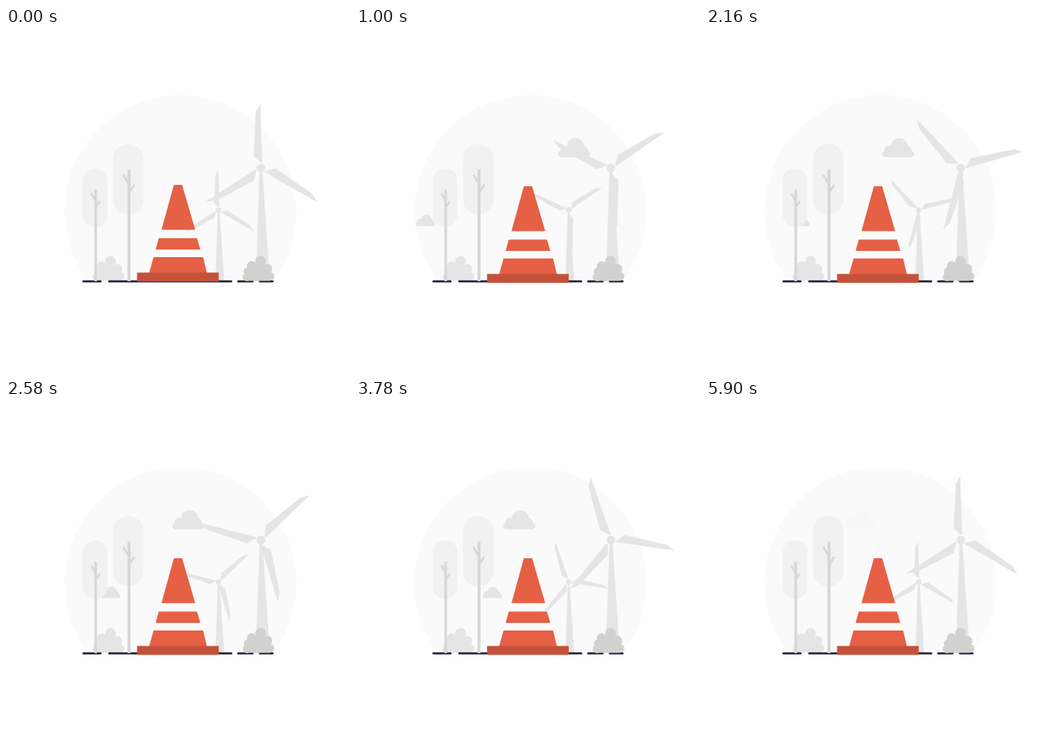
Recreate the animation shown at these times as an HTML page. Size 500 by 500 pixels, loop 6020 ms.

```html
<!DOCTYPE html>
<html lang="en">
<head>
<meta charset="utf-8">
<title>Under construction</title>
<style>
  html, body { margin: 0; width: 100%; height: 100%; overflow: hidden; background: #fff; }
  svg { display: block; width: 100%; height: 100%; }
  .light { fill: #e5e5e5; }
  .crown { fill: #f1f1f1; }
  .wood { fill: none; stroke: #d7d7d7; }
  .ground { stroke: #25233c; stroke-width: 3; stroke-linecap: round; }
</style>
</head>
<body>
<svg viewBox="0 0 500 500">
  <defs>
    <clipPath id="horizon"><rect width="500" height="367"/></clipPath>
    <path id="blade" d="M-1-93.5L-7.5-81L-10.5-18L.5-7L2-8Z"/>
    <g id="rotor">
      <use href="#blade"/>
      <use href="#blade" transform="rotate(122) scale(1.03)"/>
      <use href="#blade" transform="rotate(239.3)"/>
      <circle r="6.3"/>
    </g>
    <path id="tower" d="M-2 5H2.3L13 164.5H-7.5Z"/>
    <g id="cloud">
      <circle cx="4.8" cy="23.2" r="4.8"/>
      <circle cx="10" cy="17.5" r="6.8"/>
      <circle cx="25" cy="12.5" r="12.5"/>
      <circle cx="36.5" cy="18" r="6.5"/>
      <circle cx="41.8" cy="23.2" r="4.8"/>
      <rect x="4.8" y="15" width="37" height="13"/>
    </g>
    <g id="bush">
      <circle cx="26" cy="8" r="7.8"/>
      <circle cx="13" cy="15" r="7"/>
      <circle cx="36" cy="19" r="7"/>
      <circle cx="8" cy="23" r="6.3"/>
      <circle cx="6" cy="31" r="6"/>
      <circle cx="40" cy="30" r="6"/>
      <path d="M13 13L26 8L37 17L40 36.5H6L8 20Z"/>
    </g>
  </defs>

  <circle cx="253.5" cy="266" r="168.5" fill="#fafafa" clip-path="url(#horizon)"/>

  <g class="light">
    <g transform="translate(309 264.5) scale(.626)">
      <use href="#tower"/><use class="rotor" href="#rotor"/>
    </g>
    <g transform="translate(370.5 203.5)">
      <use href="#tower"/><use class="rotor" href="#rotor"/>
    </g>
    <use id="high" href="#cloud"/>
    <use id="low" href="#cloud"/>
    <use href="#bush" x="126" y="331"/>
  </g>

  <path class="ground" d="M112.5 368.3H137.5M150 368.3H327.5M337.5 368.3H358.5M369 368.3H387.5"/>

  <rect class="crown" x="155.5" y="168.5" width="44.5" height="102.5" rx="22"/>
  <rect class="crown" x="111.5" y="204" width="36" height="85" rx="18"/>
  <path class="wood" stroke-width="4.4" d="M178.8 205.5V368"/>
  <path class="wood" stroke-width="3.2" d="M170.5 213.5L178.5 227M186.5 228L179 239"/>
  <path class="wood" stroke-width="3.8" d="M130.4 235V368"/>
  <path class="wood" stroke-width="2.8" d="M124 240.5L130.4 252M136.5 252L130.8 260.5"/>

  <use href="#bush" x="344" y="331" fill="#d2d1cf"/>

  <g id="cone">
    <path fill="#e66045" d="M244 230H256L275 295.3H226ZM222 307.5H277.6L282.5 324H217.5ZM214.5 335H286.5L292 358H208Z"/>
    <rect x="190.5" y="357.5" width="118.7" height="13" fill="#c3523b"/>
  </g>
</svg>
<script>
  const LOOP = 6020, END = 5900;

  // [time in ms, value]
  const SPIN = [[0, 0], [500, 23], [1000, 57], [2160, 196.5], [3040, 397.5], [3780, 580.5],
                [4300, 652], [4840, 691], [5400, 713], [END, 720]];
  const HIGH_X = [[0, 322], [1000, 294], [2160, 256], [3040, 228], [3780, 214], [4840, 204], [END, 201]];
  const LOW_X = [[0, 66], [1000, 87], [2160, 122.5], [3040, 156], [3780, 184], [4840, 217.5], [END, 237]];

  const clamp = v => Math.max(0, Math.min(1, v));

  const slope = (k, i) => (k[i + 1][1] - k[i][1]) / (k[i + 1][0] - k[i][0]);

  function tangent(k, i) {
    if (i === 0) return slope(k, 0);
    if (i === k.length - 1) return slope(k, i - 1);
    const before = k[i][0] - k[i - 1][0], after = k[i + 1][0] - k[i][0];
    return (slope(k, i - 1) * after + slope(k, i) * before) / (before + after);
  }

  // Smooth Hermite curve through the keys
  function follow(k, t) {
    let i = 0;
    while (i < k.length - 2 && t > k[i + 1][0]) i++;
    const h = k[i + 1][0] - k[i][0], u = (t - k[i][0]) / h, v = 1 - u;
    return k[i][1] * v * v * (1 + 2 * u) + k[i + 1][1] * u * u * (1 + 2 * v)
      + h * u * v * (tangent(k, i) * v - tangent(k, i + 1) * u);
  }

  const byId = id => document.getElementById(id);
  const place = (el, value) => el.setAttribute('transform', value);
  const rotors = document.querySelectorAll('.rotor');
  const high = byId('high'), low = byId('low'), cone = byId('cone');

  function draw(now) {
    const t = Math.min(now % LOOP, END);

    const angle = follow(SPIN, t);
    rotors.forEach(r => place(r, `rotate(${angle})`));

    const fade = clamp(t / 700) * clamp((5950 - t) / 900);
    place(high, `translate(${follow(HIGH_X, t)} 160)`);
    place(low, `translate(${follow(LOW_X, t)} 271) scale(.605)`);
    high.style.opacity = low.style.opacity = fade;

    const hop = clamp((t + 20) / 900);
    place(cone, `translate(0 ${-88 * hop * (1 - hop)})`);
  }

  const start = performance.now();
  function tick() {
    draw(performance.now() - start);
    requestAnimationFrame(tick);
  }
  tick();
</script>
</body>
</html>
```
